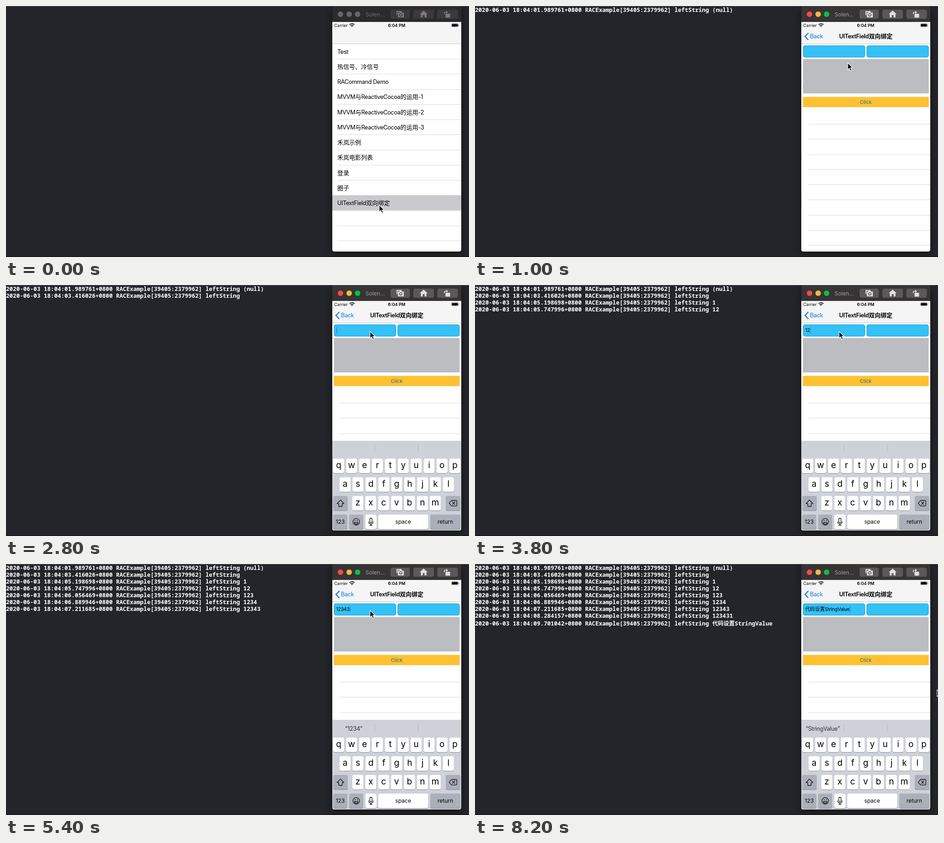
Write an HTML page that moves like this. It is 1016 px wide and 551 px high and loops after 8400 ms.

```html
<!DOCTYPE html>
<html lang="zh">
<head>
<meta charset="utf-8">
<title>Two-way text field binding</title>
<style>
html, body { margin: 0; width: 100%; height: 100%; overflow: hidden; background: #24252a; }
svg { display: block; width: 1016px; height: 551px; }
text { font: 13px Inter, "Noto Sans CJK SC", "Noto Sans CJK", sans-serif; fill: #000; }
.la { font-size: .985em; letter-spacing: -.031em; }
.mid { text-anchor: middle; }
.log text { font: 700 12.58px "Noto Sans Mono", "Noto Sans CJK SC", "Noto Sans CJK", monospace; fill: #fff; }
.log .cjk { font-size: 12.25px; }
.chrome { fill: #373435; }
.btn { fill: #5b5859; }
.icon { fill: #e2e0e1; }
.cut { fill: #5b5859; stroke: #5b5859; }
.name { font-size: 12px; fill: #a19e9f; }
.idle .chrome { fill: #2b2a2c; }
.idle .btn { fill: #3b393b; }
.idle .icon { fill: #7c7a7c; }
.idle .cut { fill: #3b393b; stroke: #3b393b; }
.idle .light { fill: #69676a; }
.idle .name { fill: #6f6d70; }
.rule { stroke: #dadadc; }
.field { fill: #34c1f5; stroke: #1d9bd3; }
.key { fill: #fff; }
.grey { fill: #abafba; }
.letter { font-size: 19px; }
.small { font-size: 12px; }
.line { fill: none; stroke: #111; stroke-width: 1.3; stroke-linejoin: round; stroke-linecap: round; }
</style>
</head>
<body>
<svg viewBox="0 0 1016 551">
  <defs>
    <clipPath id="frame"><path d="M716 5q0-5 5-5h273q5 0 5 5v529q0 5-5 5H721q-5 0-5-5z"/></clipPath>
    <clipPath id="body"><rect x="716" y="83" width="283" height="456"/></clipPath>
    <filter id="blur" x="-20%" y="-10%" width="140%" height="120%"><feGaussianBlur stdDeviation="7"/></filter>
  </defs>
  <rect width="1016" height="551" fill="#24252a"/>
  <rect width="1016" height="1" fill="#56575b"/>
  <rect y="549" width="1016" height="2" fill="#1f1a21"/>
  <g class="log" id="log"></g>
  <rect x="714" y="6" width="287" height="538" rx="5" fill="#000" opacity=".4" filter="url(#blur)"/>

  <g clip-path="url(#frame)">
    <g clip-path="url(#body)">
      <g id="list">
        <rect x="716" y="83" width="283" height="456" fill="#fff"/>
        <rect x="716" y="415.5" width="283" height="33" fill="#c9c9ce"/>
      </g>
      <g id="page">
        <rect x="716" y="83" width="283" height="456" fill="#fff"/>
        <rect class="field" x="720" y="87" width="135.5" height="25.5" rx="4"/>
        <rect class="field" x="859.5" y="87" width="135.5" height="25.5" rx="4"/>
        <text id="value" x="724.5" y="103.3" style="font-size:10.8px"></text>
        <rect id="caret" y="93" width="1.3" height="13" fill="#2f6fd0"/>
        <rect x="719.5" y="116.5" width="276" height="75.5" fill="#bcbdc1"/>
        <rect x="719.5" y="199.5" width="276" height="22.5" fill="#ffc131"/>
        <text id="click" class="mid" x="857.3" y="215" style="font-size:11px;fill:#1f7089">Click</text>
      </g>
      <g id="keys">
        <rect width="283" height="200" x="716" fill="#ced1d8"/>
        <path d="M809.5 7v19M904.5 7v19" stroke="#b9bcc3"/>
        <text id="hint" class="mid" x="763" y="24" style="fill:#333"></text>
      </g>
    </g>

    <rect x="716" y="35" width="283" height="48" fill="#f6f5f6"/>
    <rect x="716" y="82.5" width="283" height="1" fill="#c9c9cb"/>
    <text x="720.5" y="46" style="font-size:9px">Carrier</text>
    <g fill="none" stroke="#000" stroke-width="1.7">
      <path d="M753.8 41a7.6 7.6 0 0 1 10.8 0M756 43.3a4.6 4.6 0 0 1 6.4 0"/>
      <path d="M757.6 44.6L759.2 46.4 760.8 44.6Q759.2 43.4 757.6 44.6z" fill="#000" stroke="none"/>
    </g>
    <text class="mid" x="857.3" y="46" style="font-size:9.3px;font-weight:600">6:04 PM</text>
    <rect x="977.5" y="38.5" width="15" height="7.5" rx="2" fill="none" stroke="#777" stroke-width=".7"/>
    <rect x="978.5" y="39.5" width="13" height="5.5" rx="1.2"/>
    <path d="M993.6 41v2.6" stroke="#777"/>
    <g id="back">
      <path d="M731.5 59.2L724 66.8l7.5 7.6" fill="none" stroke="#0a7ddd" stroke-width="2.2"/>
      <text x="735" y="71.3" style="fill:#0a7ddd"><tspan class="la">Back</tspan></text>
    </g>
    <text id="title" class="mid" x="857.5" y="71.3" style="font-weight:600"></text>

    <g id="bar">
      <rect class="chrome" x="716" width="283" height="35"/>
      <rect x="716" width="283" height="1" fill="#5d5a5c"/>
      <circle class="light" cx="734" cy="18" r="6" fill="#fc4a48"/>
      <circle class="light" cx="753" cy="18" r="6" fill="#f6b746"/>
      <circle class="light" cx="771.5" cy="18" r="6" fill="#07c23d"/>
      <text class="name" x="789" y="22.5">Solen...</text>
      <rect class="btn" x="844" y="8" width="42" height="20" rx="4"/>
      <rect class="btn" x="894" y="8" width="45" height="20" rx="4"/>
      <rect class="btn" x="946.5" y="8" width="45" height="20" rx="4"/>
      <g class="icon">
        <path d="M857 11h11v2h-9v7h-2z"/>
        <path d="M860 14.5h3l1-1.5h4l1 1.5h4V25h-13z"/>
        <circle class="cut" cx="866.3" cy="19.6" r="3.2"/>
        <circle cx="866.3" cy="19.6" r="2"/>
        <path d="M916.5 10l8.5 8h-2.3v7h-4.2v-5h-4v5h-4.2v-7H908z"/>
        <rect x="964.5" y="17" width="10" height="8.5" rx="1"/>
        <path d="M961 18v-2.5q0-2.5 2.5-2.5h2.5v-2.5l4 3.3-4 3.3v-2.5h-2q-1.3 0-1.3 1.3V18z"/>
      </g>
    </g>
  </g>

  <g id="mouse">
    <path d="M0 0V15L3.5 11.7 5.9 17.2 8.5 16 6.1 10.8H10.8Z" fill="#000" stroke="#fff" stroke-width="1.1"/>
  </g>
</svg>

<script>
const LOOP = 8400, STEP = 200;
const $ = id => document.getElementById(id);
const add = (id, markup) => $(id).insertAdjacentHTML('beforeend', markup);
const mix = s => s.replace(/[\x20-\x7e“”]+/g, m => `<tspan class="la">${m}</tspan>`);
const rule = (x, y) => `<path class="rule" d="M${x} ${y}H999"/>`;

// Home list
const rows = ['Test', '热信号、冷信号', 'RACommand Demo',
  ...[1, 2, 3].map(n => `MVVM与ReactiveCocoa的运用-${n}`),
  '禾岚示例', '禾岚电影列表', '登录', '圈子', 'UITextField双向绑定'];
for (let i = 0; i < 13; i++) {
  const y = 83 + i * 33.25;
  add('list', rule(i === 9 || i === 10 ? 716 : 727, Math.round(y + 33) + .5) +
    (rows[i] ? `<text x="727" y="${y + 21.6}">${mix(rows[i])}</text>` : ''));
}
$('title').innerHTML = mix('UITextField双向绑定');

// Detail page
for (let i = 0; i < 9; i++) add('page', rule(731, Math.round(259 + i * 33.25) + .3));

// Keyboard, drawn from its own top edge
const key = (x, y, w, cls = '') =>
  `<rect x="${x}" y="${y + 1}" width="${w}" height="32" rx="4" fill="#8b8d92"/>` +
  `<rect class="key ${cls}" x="${x}" y="${y}" width="${w}" height="32" rx="4"/>`;
const label = (x, s) => `<text class="mid small" x="${x}" y="182">${s}</text>`;
[['qwertyuiop', 730], ['asdfghjkl', 744], ['zxcvbnm', 772]].forEach(([letters, x0], r) => {
  [...letters].forEach((c, i) => {
    const x = x0 + i * 28.35, y = 39 + r * 41;
    add('keys', key(x - 12.1, y, 24.2) +
      `<text class="mid letter" x="${x}" y="${y + 21.3}">${c}</text>`);
  });
});
add('keys',
  key(718, 121, 32, 'grey') + key(965, 121, 32, 'grey') +
  key(718, 162, 31, 'grey') + key(753, 162, 31, 'grey') +
  key(788.5, 162, 24.5) + key(817, 162, 109.5) + key(931, 162, 66, 'grey') +
  label(733.5, '123') + label(871.5, 'space') + label(964, 'return') +
  `<g class="line">
    <path d="M734 130l7.5 7.8h-3.8v6.2h-7.4v-6.2h-3.8z"/>
    <path d="M978 131h9.5q1.8 0 1.8 1.8v8.6q0 1.8-1.8 1.8H978l-5.5-6.1zM979.7 134.3l5.4 5.6m0-5.6l-5.4 5.6"/>
    <circle cx="768.5" cy="178" r="7.3"/>
    <path d="M764.3 179.5h8.4q-.8 4-4.2 4t-4.2-4z"/>
    <path d="M766 175v.8m5-.8v.8" stroke-width="1.7"/>
    <rect x="798.4" y="170" width="4.8" height="10" rx="2.4"/>
    <path d="M796 177.5v1q0 4 4.8 4t4.8-4v-1M800.8 182.5v3m-2.6 0h5.2"/>
  </g>`);

// Console output: seconds on the log clock and the value printed
const CLOCK = 1950;
const log = [['01.989761', '(null)'], ['03.416026', ''], ['05.198698', '1'],
  ['05.747996', '12'], ['06.056469', '123'], ['06.889946', '1234'],
  ['07.211685', '12343'], ['08.284157', '123431'], ['09.701042', '代码设置StringValue']
].map(([sec, value]) => ({ sec, value, at: sec * 1000 - CLOCK }));
log.forEach((e, i) => {
  const shown = e.value.replace(/[^\x00-\x7f]+/, m => `<tspan class="cjk">${m}</tspan>`);
  add('log', `<text x="0" y="${12.5 + i * 15 + (i === 8 ? 2 : 0)}">` +
    `2020-06-03 18:04:${e.sec}+0800 RACExample[39405:2379962] leftString ${shown}</text>`);
  e.el = $('log').lastElementChild;
});

const hints = [[4400, '123'], [5200, '1234'], [5600, '12343'], [6600, '123431'], [8000, 'StringValue']];
const path = [[0, 819, 437], [400, 819, 437], [1000, 818, 125], [1200, 799, 102],
  [6200, 799, 102], [6600, 806, 180], [7400, 857, 207], [7800, 857, 207], [8200, 1014, 276], [8400, 1014, 276]];
const PUSH = 200, TAP = 1420;

// Critically damped spring, 0 to 1
const spring = (ms, rate) => {
  const x = Math.max(0, ms) / 1000 * rate;
  return 1 - (1 + x) * Math.exp(-x);
};
const move = (id, x, y) => $(id).setAttribute('transform', `translate(${x.toFixed(2)} ${y.toFixed(2)})`);

function pointer(t) {
  const i = path.findIndex(p => p[0] > t);
  const [t0, x0, y0] = path[i - 1], [t1, x1, y1] = path[i];
  const k = (t - t0) / (t1 - t0);
  return [x0 + (x1 - x0) * k, y0 + (y1 - y0) * k];
}

function draw(t) {
  $('bar').setAttribute('class', t < PUSH ? 'idle' : '');
  const p = spring(t - PUSH, 12);
  move('list', -85 * p, 0);
  move('page', 283 * (1 - p), 0);
  move('title', 120 * (1 - p), 0);
  $('title').style.opacity = $('back').style.opacity = p;

  const seen = log.filter(e => t >= e.at);
  log.forEach(e => e.el.style.display = t >= e.at ? '' : 'none');
  const last = seen[seen.length - 1];
  $('value').innerHTML = seen.length > 1 ? mix(last.value) : '';

  const since = t - (seen.length > 1 ? last.at : TAP);
  const on = t >= TAP && since % 1000 < 600;
  $('caret').setAttribute('x', 725 + $('value').getComputedTextLength());
  $('caret').style.opacity = on ? .85 : 0;

  move('keys', 0, 539 - 197 * spring(t - TAP, 17.5));
  const hint = hints.filter(h => t >= h[0]).pop();
  $('hint').innerHTML = hint ? mix(`“${hint[1]}”`) : '';
  $('click').style.opacity = t >= 7400 && t < 7800 ? .35 : 1;
  move('mouse', ...pointer(t));
}

const start = performance.now();
let shown = -1;
function tick() {
  const t = Math.floor((performance.now() - start) % LOOP / STEP) * STEP;
  if (t !== shown) draw(shown = t);
  requestAnimationFrame(tick);
}
tick();
</script>
</body>
</html>
```
